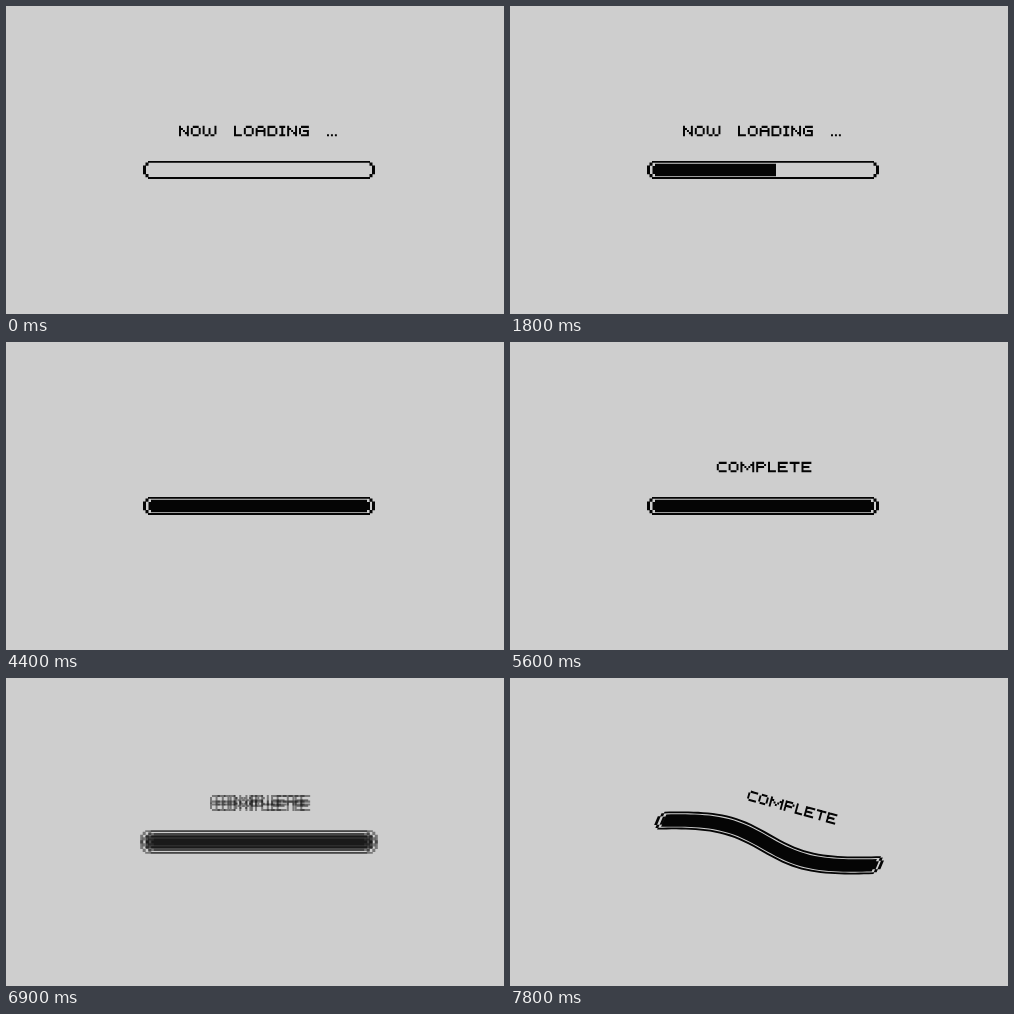
An HTML page with a canvas for the animation above (8 s loop, 498 by 308 pixels).

```html
<!DOCTYPE html>
<html lang="en">
<head>
<meta charset="utf-8">
<title>Now loading</title>
<style>
  html, body { margin: 0; width: 100%; height: 100%; overflow: hidden; background: #cecece; }
  canvas { display: block; width: 498px; height: 308px; }
</style>
</head>
<body>
<canvas id="stage" width="498" height="308" role="img" aria-label="NOW LOADING ... COMPLETE"></canvas>
<script>
const ctx = document.getElementById('stage').getContext('2d');
const LOOP = 8000;
const UNIT_X = 1.97, UNIT_Y = 2.1, TEXT_Y = 119.8;

// Pixel letters: column count, then strokes as x0 y0 x1 y1 on a five-row grid.
const GLYPHS = {
  N: '5 0004 4044 1133',
  O: '5 1030 1434 0103 4143',
  W: '7 0003 6063 3133 1424 4454',
  L: '4 0004 0434',
  A: '5 1030 0104 4144 0242',
  D: '5 0004 0030 0434 4143',
  I: '3 0020 0424 1014',
  G: '5 1040 0103 1444 4243 2242',
  C: '5 1040 0103 1444',
  M: '7 0004 6064 1133 5133',
  P: '5 0004 0030 0232 4141',
  T: '5 0040 2024',
  E: '5 0040 0004 0444 0232',
  '.': '1 0404'
};

// Moment and right edge of the progress fill.
const PROGRESS = [
  [200, 155], [400, 169], [600, 183], [800, 197], [1000, 211], [1200, 225],
  [1300, 233], [1500, 247], [1600, 254], [1800, 266], [2000, 281], [2100, 295],
  [2400, 310], [2600, 327], [2700, 338],
  [3000, 344], [3100, 349], [3300, 354], [3400, 358], [3700, 364]
];

const still = (x, y) => [x, y];
const shear = (slope, pivot) => (x, y) => [x + slope * (y - pivot), y];

// Bends the bar into an S and turns the caption with it.
const twist = amt => (x, y) => {
  if (y < 140) {
    const a = 0.27 * amt, u = (x - 253.5) * 0.97, v = y - 125;
    return [
      253.5 + 28 * amt + u * Math.cos(a) - v * Math.sin(a),
      129.2 + u * Math.sin(a) + v * Math.cos(a)
    ];
  }
  const mid = 253 + (x - 253) * (1 - 0.025 * amt) + 6 * amt, u = mid - 256;
  const dy = 1 + 25 * Math.tanh(u / 44) * (1 - 0.12 * (u / 120) ** 2);
  return [mid - 0.42 * amt * (y - 164), y + amt * dy];
};

const GLITCHES = [
  [6700, still], [6900, still, 2.8], [7100, shear(-2.1, 107)], [7300, shear(1.17, 108.7)],
  [7400, shear(2, 107)], [7600, twist(-0.85)], [7800, twist(1)]
];

const latest = (list, t) => list.filter(e => e[0] <= t).pop();

let warp = still;

function rect(x, y, w, h) {
  const n = Math.max(1, Math.ceil(w / 5)), pts = [];
  for (let i = 0; i <= n; i++) pts.push(warp(x + w * i / n, y));
  for (let i = n; i >= 0; i--) pts.push(warp(x + w * i / n, y + h));
  pts.forEach((p, i) => i ? ctx.lineTo(...p) : ctx.moveTo(...p));
  ctx.closePath();
}

function word(text, x) {
  const block = (col, row, w, h) =>
    rect(x + col * UNIT_X, TEXT_Y + row * UNIT_Y, w * UNIT_X, h * UNIT_Y);
  for (const ch of text) {
    const [cols, ...strokes] = GLYPHS[ch].split(' ');
    for (const s of strokes) {
      const [x0, y0, x1, y1] = [...s].map(Number);
      const dx = x1 - x0, dy = y1 - y0;
      if (dx && dy) {
        for (let i = 0; i <= dy; i++) block(x0 + i * Math.sign(dx), y0 + i, 1, 1);
      } else {
        block(x0, y0, dx + 1, dy + 1);
      }
    }
    x += (+cols + 1) * UNIT_X;
  }
}

function frameBar() {
  rect(142, 155, 222, 1.8);
  rect(142, 171.1, 222, 1.8);
  for (const [x, y, w, h] of [[139.5, 156.5, 3, 3.2], [137, 159.5, 3, 8.7], [139.5, 168, 3, 3.2]]) {
    rect(x, y, w, h);
    rect(506 - x - w, y, w, h);
  }
}

function fillBar(right) {
  rect(142.5, 160, 2.5, 8);
  rect(145, 157.8, Math.min(right, 361) - 145, 12.4);
  if (right > 361) rect(361, 160, right - 361, 8);
}

function caption(t) {
  if (t < 4100) {
    word('NOW', 173);
    word('LOADING', 228);
    word('...', 321);
    return;
  }
  const blink = Math.floor((t - 4351) / 175);
  if (t < 4400 || t >= 6700 || blink % 2) word('COMPLETE', 206.8);
}

function draw(now) {
  const t = Math.floor(now % LOOP / 100) * 100;
  const [, bend, spread] = latest(GLITCHES, t) || [0, still];
  const step = latest(PROGRESS, t);
  const offsets = spread ? [-spread, spread] : [0];

  ctx.globalAlpha = 1;
  ctx.fillStyle = '#cecece';
  ctx.fillRect(0, 0, 498, 308);
  ctx.fillStyle = '#050505';
  ctx.globalAlpha = spread ? 0.43 : 1;
  for (const ox of offsets) for (const oy of offsets) {
    warp = (x, y) => bend(x + ox, y + oy);
    ctx.beginPath();
    frameBar();
    if (step) fillBar(step[1]);
    caption(t);
    ctx.fill();
  }
}

function tick() {
  draw(performance.now());
  requestAnimationFrame(tick);
}
tick();
</script>
</body>
</html>
```
